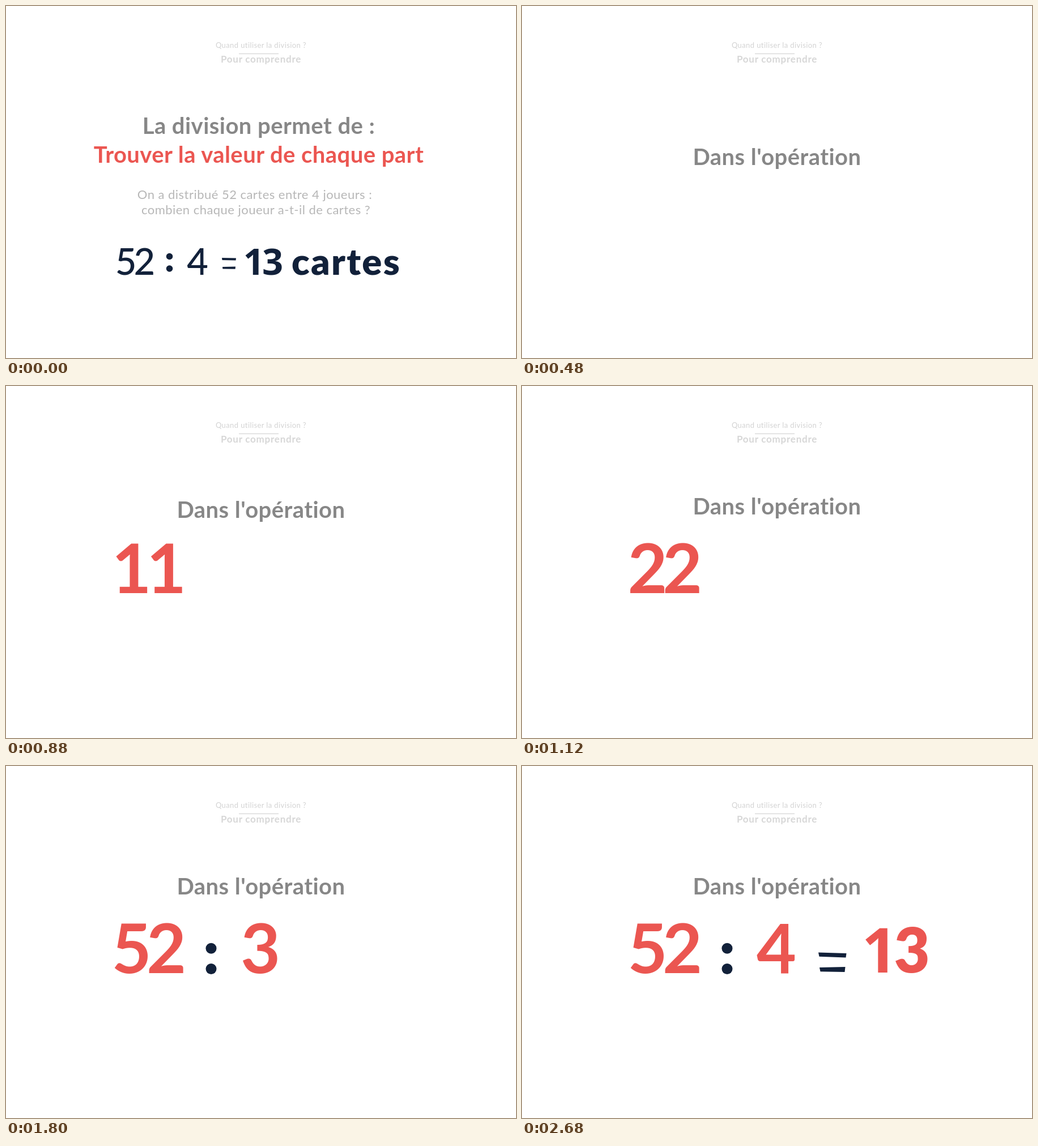
These frames come from a looping animation (900x622 px, 2.72 s). An HTML page:

```html
<!DOCTYPE html>
<html lang="fr">
<head>
<meta charset="utf-8">
<title>La division</title>
<style>
  html, body { margin: 0; width: 100%; height: 100%; overflow: hidden; background: #fff; }
  svg { display: block; width: 900px; height: 622px; }
  text { font-family: Lato, sans-serif; text-anchor: middle; }
  .topic { font-size: 13px; letter-spacing: .4px; fill: #d3d3d3; }
  .section { font-size: 17px; font-weight: 700; letter-spacing: .75px; fill: #d7d7d7; }
  .title { font-size: 40px; font-weight: 700; letter-spacing: .45px; fill: #878787; }
  .goal { fill: #eb5651; }
  .problem { font-size: 22px; letter-spacing: .47px; fill: #b7b7b7; }
  .sum { font-size: 65px; font-weight: 500; letter-spacing: -5px; fill: #12213a; }
  .heavy { font-weight: 900; letter-spacing: 2.4px; }
  .navy { fill: #12213a; }
  .digit { font-size: 121px; font-weight: 700; fill: #eb5651; }
  .result { font-size: 109px; font-weight: 900; }
  .plain { font-family: "Noto Sans", "Open Sans", sans-serif; letter-spacing: -4px; }
</style>
</head>
<body>
<svg viewBox="0 0 900 622">
  <text class="topic" x="450" y="74">Quand utiliser la division ?</text>
  <rect x="411" y="83.5" width="70" height="1.7" fill="#dedede"/>
  <text class="section" x="450" y="100">Pour comprendre</text>

  <g id="intro">
    <text class="title" x="446" y="226">La division permet de :</text>
    <text class="title goal" x="446" y="277">Trouver la valeur de chaque part</text>
    <text class="problem" x="439" y="341">On a distribué 52 cartes entre 4 joueurs :</text>
    <text class="problem" x="441" y="368">combien chaque joueur a-t-il de cartes ?</text>
    <text class="sum" x="225.5" y="475">52</text>
    <g class="navy">
      <circle cx="288.5" cy="442.5" r="5.8"/>
      <circle cx="288.5" cy="464" r="5.8"/>
      <path d="M381 445l25 .6-.5 4-24-.6zM382 461l23-.4-.4 4.2-22.2-.3z"/>
    </g>
    <text class="sum" x="335.5" y="475">4</text>
    <text class="sum heavy plain" x="452" y="475">13</text>
    <text class="sum heavy" x="600.5" y="475">cartes</text>
  </g>

  <g id="operation">
    <text id="heading" class="title" x="450" y="227">Dans l'opération</text>
    <g id="dividend">
      <text class="digit" x="221.5" y="366"></text>
      <text class="digit" x="283" y="366"></text>
    </g>
    <g id="divisor">
      <g class="navy">
        <circle cx="362" cy="322.3" r="9.5"/>
        <circle cx="362" cy="358.5" r="9.5"/>
      </g>
      <text class="digit" x="449" y="366"></text>
    </g>
    <g id="quotient">
      <path class="navy" d="M523 329.5L572.5 331 571.5 338.500 524.500 336.700zM525 356L570.500 355 569.500 364 526.500 363.300z"/>
      <text class="digit result plain" x="629" y="365"></text>
      <text class="digit result" x="688" y="365"></text>
    </g>
  </g>
</svg>
<script>
  const LOOP = 2720, STEP = 40, FADE = 200;
  const $ = id => document.getElementById(id);
  const clamp = (v, lo, hi) => Math.min(hi, Math.max(lo, v));

  const counters = [
    { id: 'dividend', start: 594, end: 52,
      value: t => { const s = t - 680; return 2 + .04705 * s + 1e-6 * s * s; } },
    { id: 'divisor', start: 1580, end: 4, value: t => 1 + (t - 1600) / 90 },
    { id: 'quotient', start: 1920, end: 13, value: t => 6 + (t - 2280) / 57.1 }
  ].map(c => ({ ...c, group: $(c.id), digits: [...$(c.id).querySelectorAll('.digit')] }));

  // Fast exponential rise, then a parabolic settle.
  const rise = t => t < 680
    ? 550 * Math.exp(-t / 206)
    : 20.3 * (Math.max(0, 1100 - t) / 420) ** 2;

  function showCounter({ group, digits, start, end, value }, t) {
    group.setAttribute('opacity', clamp((t - start) / FADE, 0, 1));
    const n = String(Math.floor(clamp(value(t), 1, end))).padStart(digits.length, ' ');
    digits.forEach((d, i) => { d.textContent = n[i].trim(); });
  }

  function draw(now) {
    const t = Math.floor((now % LOOP) / STEP) * STEP;
    const first = t < STEP;
    $('intro').style.display = first ? '' : 'none';
    $('operation').style.display = first ? 'none' : '';
    $('heading').setAttribute('y', 227 + rise(t));
    counters.forEach(c => showCounter(c, t));
  }

  const begin = performance.now();
  function tick() {
    draw(performance.now() - begin);
    requestAnimationFrame(tick);
  }
  tick();
</script>
</body>
</html>
```
